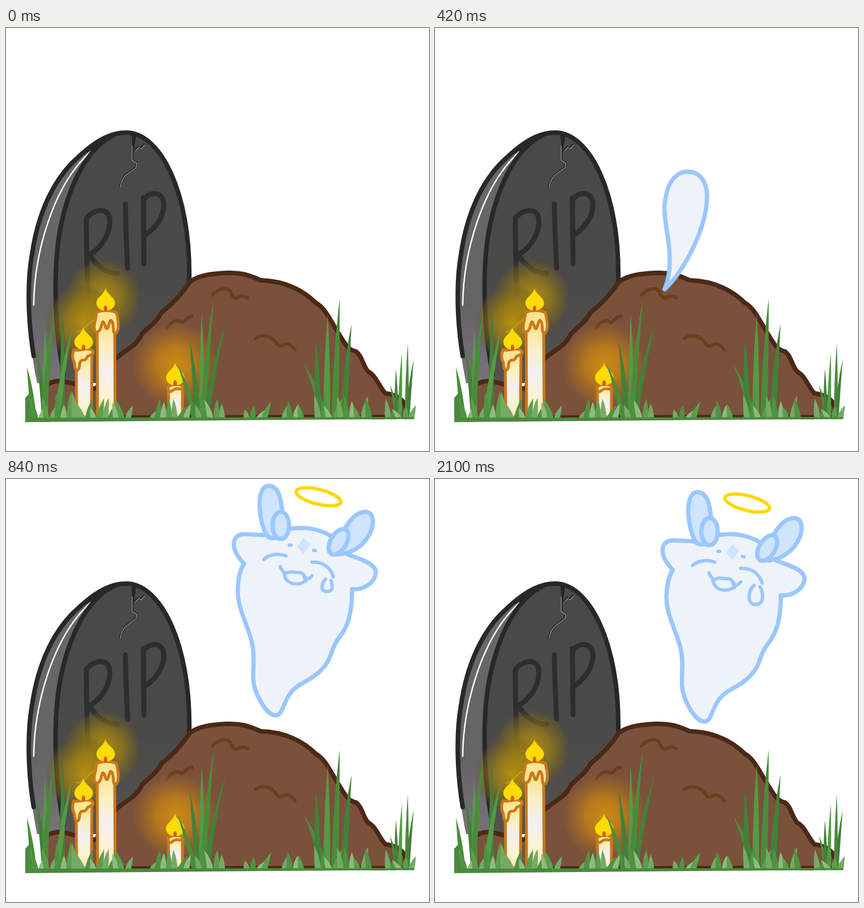
These frames come from a looping animation (748 by 748 pixels, 2520 ms). An HTML page:

```html
<!DOCTYPE html>
<html lang="en">
<head>
<meta charset="utf-8">
<title>Rising ghost</title>
<style>
html, body { margin: 0; width: 100%; height: 100%; overflow: hidden; background: #fff; }
svg { display: block; width: 100vw; height: 100vh; }
.line { fill: none; stroke-linecap: round; stroke-linejoin: round; }
.spirit { fill: #eef3fa; stroke: #9ac7ff; stroke-width: 7.5; stroke-linecap: round; stroke-linejoin: round; }
.horn { fill: #cfe4fd; }
.none { fill: none; }
.halo { fill: none; stroke: #ffd60a; stroke-width: 6; }
.wax { stroke: #c9781c; stroke-width: 5; stroke-linejoin: round; stroke-linecap: round; }
</style>
</head>
<body>
<svg viewBox="0 0 748 748">
<defs>
  <radialGradient id="warm">
    <stop offset="0" stop-color="#cf8c14"/>
    <stop offset=".45" stop-color="#bb7b1a" stop-opacity=".9"/>
    <stop offset=".8" stop-color="#a06826" stop-opacity=".5"/>
    <stop offset="1" stop-color="#8a5a30" stop-opacity="0"/>
  </radialGradient>
  <radialGradient id="gold">
    <stop offset="0" stop-color="#c0960c" stop-opacity=".9"/>
    <stop offset=".5" stop-color="#a08012" stop-opacity=".7"/>
    <stop offset=".85" stop-color="#75621e" stop-opacity=".42"/>
    <stop offset="1" stop-color="#5c5134" stop-opacity="0"/>
  </radialGradient>
  <linearGradient id="wax" x2="0" y2="1">
    <stop offset="0" stop-color="#fbdc74"/>
    <stop offset=".3" stop-color="#fcefc0"/>
    <stop offset=".55" stop-color="#f3eff2"/>
    <stop offset=".8" stop-color="#fdf3d3"/>
    <stop offset="1" stop-color="#fbe7ae"/>
  </linearGradient>
  <linearGradient id="face" x2="0" y2="1">
    <stop offset="0" stop-color="#494948"/>
    <stop offset=".6" stop-color="#4a4a49"/>
    <stop offset="1" stop-color="#55534f"/>
  </linearGradient>
  <linearGradient id="side" x2="0" y2="1">
    <stop offset="0" stop-color="#696969"/>
    <stop offset=".7" stop-color="#656465"/>
    <stop offset="1" stop-color="#77727a"/>
  </linearGradient>
</defs>

<g id="stone">
  <path fill="url(#side)" d="M55 628C38 545 35 460 46 400C57 325 85 266 127 229C164 194 193 185 212 185L150 300L105 628Z"/>
  <path fill="#272829" d="M122 232C160 195 190 181 214 182L214 190C180 194 160 212 142 230L150 217Z"/>
  <path class="line" stroke="#fff" stroke-width="2.5" d="M49 490C50 400 82 280 149 219"/>
  <path fill="url(#face)" d="M103 628C85 540 82 430 95 360C108 280 145 200 212 186C272 184 327 290 325 445L300 628Z"/>
  <g class="line" stroke="#272829" stroke-width="8">
    <path d="M49 580C39 520 37 450 46 400C57 325 85 266 127 229C164 194 190 185 212 185C272 184 327 290 324 446"/>
    <path d="M102 612C86 535 83 430 95 360C108 290 138 215 190 190"/>
  </g>
  <path fill="#222" d="M222 188L230 190L227 212L224 218Z"/>
  <g class="line" stroke="#262626" stroke-width="3.5">
    <path d="M226 192Q223 215 224 234L231 238L229 247L210 261L201 280"/>
    <path d="M228 216L234 210L238 213L244 206"/>
  </g>
  <path class="line" stroke="#8b8b8b" stroke-width="1.5" d="M223 208L223 234L231 239L230 247L211 261Q204 270 202 281M229 217L235 211L239 214L245 207"/>
  <g id="lettering" class="line" stroke="#2e2e2f" stroke-width="9">
    <path d="M142 337C142 380 143 430 146 471M142 337C152 322 178 315 183 335C187 360 170 389 147 401C160 421 180 435 197 434"/>
    <path d="M211 311Q212 365 215 425"/>
    <path d="M243 300L244 417M243 305C250 290 276 286 279 309C281 335 262 355 246 366"/>
  </g>
</g>

<path fill="#7a513b" stroke="#4b2916" stroke-width="8" stroke-linejoin="round" d="M70 645C66 629 80 625 96 624C125 629 150 640 160 637C172 612 186 590 197 582C215 567 232 561 240 541C255 527 267 519 275 503C292 490 310 472 325 449C340 437 365 434 392 433C415 432 430 437 450 446C490 447 522 461 548 486C565 495 575 520 588 540C598 555 604 570 619 572C630 580 632 600 641 608C655 615 661 637 671 646C685 648 701 654 706 668C710 680 709 686 706 688L72 689Z"/>
<path class="line" stroke="#6d3e1f" stroke-width="6" d="M365 472C375 461 390 457 397 466C398 472 403 478 408 478C415 472 420 474 427 477M285 531C292 518 305 514 310 521C315 521 321 508 329 510M441 549C455 540 470 545 477 556C482 563 486 564 491 560C500 556 507 563 511 569"/>

<g id="glows">
  <circle cx="171" cy="477" r="69" fill="url(#gold)"/>
  <circle cx="137" cy="522" r="68" fill="url(#gold)"/>
  <circle cx="300" cy="596" r="78" fill="url(#warm)"/>
</g>
<path class="line" stroke="#c69a1c" stroke-width="2" d="M125 537C130 542 145 522 156 516"/>

<g id="candles">
  <path class="wax" fill="url(#wax)" d="M124 574Q138 566 152 571L151 688H125Z"/>
  <path class="wax" fill="#fbe598" d="M120 569C130 573 142 563 153 570C158 580 144 577 143 583C139 592 133 582 130 594C130 610 121 608 121 592C116 584 117 577 120 569Z"/>
  <path class="wax" fill="url(#wax)" d="M161 510H192L193 688H162Z"/>
  <path class="wax" fill="#fce391" d="M160 503Q177 496 195 503C200 520 200 536 194 540C187 540 192 524 187 518C182 512 182 536 177 531C173 520 172 515 169 525C166 541 156 540 156 531C156 520 160 512 160 503Z"/>
  <path class="wax" fill="url(#wax)" d="M287 637Q300 628 312 634V688H288Z"/>
  <path class="wax" fill="#fbe598" d="M286 635Q299 626 312 633C314 642 307 637 302 638C295 637 294 645 288 643Z"/>
</g>
<g id="flames"></g>
<g id="grass"></g>

<g id="poses">
  <path class="spirit" d="M402 464C407 450 405 440 402 426C401 416 408 413 415 413C425 413 427 421 426 431C424 446 412 459 402 464Z"/>
  <path class="spirit" d="M402 461C410 445 412 430 410 415C405 385 399 365 401 343C402 322 415 315 428 315C445 315 457 330 456 355C455 385 440 430 402 461Z"/>
  <path class="spirit" d="M406 462C418 435 416 400 412 372C406 335 404 315 408 300C412 270 428 255 445 254C468 253 482 272 481 300C480 350 445 425 406 462Z"/>
  <g class="spirit">
    <path d="M404 465C404 450 406 440 413 436C424 432 426 441 423 450C420 460 412 464 404 465Z"/>
    <path d="M437 211C428 211 420 207 412 213C408 222 414 232 422 239C409 270 415 290 421 318C426 340 432 375 425 403C420 412 418 421 424 421C430 420 433 410 440 393C450 375 465 355 487 325C500 305 521 285 519 253C524 255 530 258 537 253C546 246 543 234 527 231L498 216C485 210 475 208 462 212Z"/>
    <g class="horn">
      <ellipse cx="445" cy="197" rx="13" ry="20" transform="rotate(-10 445 197)"/>
      <ellipse cx="457" cy="208" rx="8" ry="13"/>
      <ellipse cx="522" cy="212" rx="13" ry="21" transform="rotate(38 522 212)"/>
      <ellipse cx="509" cy="221" rx="8" ry="13" transform="rotate(28 509 221)"/>
    </g>
    <path class="none" stroke-width="6" d="M459 233h1M489 237l1 .3M440 247Q447 242 457 247M484 248Q494 251 499 261M452 258Q457 263 464 258Q470 257 474 263Q480 267 487 263"/>
    <path class="horn" stroke="none" d="M476 220L484 227L476 236L469 228Z"/>
    <ellipse class="halo" cx="490" cy="181" rx="19" ry="10" transform="rotate(15 490 181)"/>
  </g>
  <g id="ghost" class="spirit">
    <path d="M456 99C448 98 442 99 436 98C425 98 409 94 404 108C399 125 412 140 421 150C414 160 411 172 410 193C408 225 424 250 434 285C440 310 437 325 437 352C438 378 460 418 477 418C490 418 490 392 506 375C518 360 540 357 558 337C577 319 573 301 588 282C604 262 612 240 612 195C633 196 652 184 654 166C655 149 622 140 605 134L575 101C555 88 525 83 498 89Z"/>
    <g class="horn">
      <path d="M462 101C447 78 440 14 464 12C484 12 487 40 489 60L478 104Q468 106 462 101Z"/>
      <ellipse cx="486" cy="82" rx="14.5" ry="24"/>
      <path d="M597 92C609 68 624 57 637 58C653 61 651 84 642 99C630 121 608 133 586 133Z"/>
      <ellipse cx="588" cy="111" rx="14" ry="25" transform="rotate(31 588 111)"/>
    </g>
    <path class="horn" stroke="none" d="M526 104L538 115Q533 126 526 132L515 120Z"/>
    <g class="none" stroke-width="6">
      <path d="M501 117h3M544 126l3 .5M456 142C465 133 483 131 495 136M541 147C558 146 573 154 579 173M485 155Q488 163 494 167M530 178Q538 176 541 171"/>
      <path d="M492 169C502 160 512 167 520 165C526 167 529 172 531 178C520 190 496 188 492 169ZM527 172L530 181"/>
      <path id="tear"/>
    </g>
    <ellipse class="halo" cx="552.5" cy="31.5" rx="40.5" ry="13" transform="rotate(14 552.5 31.5)"/>
  </g>
</g>
</svg>
<script>
const byId = id => document.getElementById(id);

function add(parent, d, fill) {
  const path = document.createElementNS("http://www.w3.org/2000/svg", "path");
  path.setAttribute("d", d);
  path.setAttribute("fill", fill);
  byId(parent).append(path);
}

let seed = 11;
function random(low, high) {
  seed = (seed * 16807) % 2147483647;
  return low + (high - low) * seed / 2147483647;
}

function flame(x, y) {
  add("flames", `M${x} ${y}C${x + 1} ${y + 11} ${x + 16} ${y + 14} ${x + 17} ${y + 27}
    C${x + 15} ${y + 44} ${x - 15} ${y + 44} ${x - 16} ${y + 27}
    C${x - 16} ${y + 15} ${x - 4} ${y + 14} ${x} ${y}Z`, "#ffdb08");
  add("flames", `M${x - 3} ${y + 41}V${y + 34}Q${x} ${y + 27} ${x + 3} ${y + 34}V${y + 41}Z`, "#dc5a12");
}
flame(176, 460);
flame(137, 529);
flame(299, 592);

const GROUND = 692;
function blade(x, tipX, height, width, fill) {
  const midX = x + (tipX - x) * 0.35, midY = GROUND - height * 0.55;
  add("grass", `M${x - width} ${GROUND}Q${midX - width} ${midY} ${tipX} ${GROUND - height}
    Q${midX + width} ${midY} ${x + width} ${GROUND}Z`, fill);
}

// Tall blades fan out from a tuft; those just right of its middle are highest.
function tuft(x, spread, count, height, width) {
  const greens = ["#4b8b3b", "#43803a", "#559a45"];
  for (let i = 0; i < count; i++) {
    const u = 2 * i / (count - 1) - 1;
    const root = x + spread * (0.35 * u + random(-0.35, 0.45));
    blade(root, x + spread * u, height * (1 - 0.4 * Math.abs(u - 0.4)), width, greens[i % 3]);
  }
}
tuft(77, 40, 6, 212, 5);
tuft(346, 43, 5, 222, 5);
tuft(569, 42, 5, 222, 6);
tuft(700, 21, 5, 140, 3.5);

function leaves(from, to, height) {
  const greens = ["#74aa66", "#4f9340", "#8dbb80", "#5b9f4c"];
  for (let x = from, i = 0; x <= to; x += 10, i++) {
    blade(x, x + random(-14, 14), height * random(0.45, 1), 5.5, greens[i % 4]);
  }
}
leaves(42, 130, 52);
leaves(135, 215, 38);
leaves(258, 322, 38);
leaves(342, 382, 55);
leaves(426, 456, 32);
leaves(492, 522, 36);
leaves(552, 642, 45);
leaves(676, 716, 40);
add("grass", "M34 654L42 645L46 689L722 688V691L34 697Z", "#4a8a3c");

function tearPath(growth) {
  const left = 558 - 4 * growth, right = 577 + 4 * growth, bottom = 199 + 12 * growth;
  return `M565 177C${left - 1} 186 ${left - 2} ${bottom} 567 ${bottom}
    C${right + 3} ${bottom} ${right} 189 575 180`;
}

const STEP = 140, RISE = 840, BOB = 420, LOOP = 2520;
const shapes = [...byId("poses").children];
const ghostIndex = shapes.indexOf(byId("ghost"));

function draw(time) {
  const shown = Math.min(Math.floor(time / STEP) - 1, ghostIndex);
  shapes.forEach((shape, i) => shape.style.display = i === shown ? "" : "none");
  if (shown < ghostIndex) return;

  const bob = Math.floor((time - RISE) / BOB);
  const rising = bob < 0;
  byId("ghost").setAttribute("transform", rising
    ? "matrix(.873 0 0 .942 47.5 53.4)"
    : `translate(${bob % 2 * -0.5} ${bob % 2 * 11})`);
  byId("tear").setAttribute("d", rising ? "" : tearPath(Math.min(bob / 2, 1)));
}

const start = performance.now();
function tick() {
  draw((performance.now() - start) % LOOP);
  requestAnimationFrame(tick);
}
tick();
</script>
</body>
</html>
```
